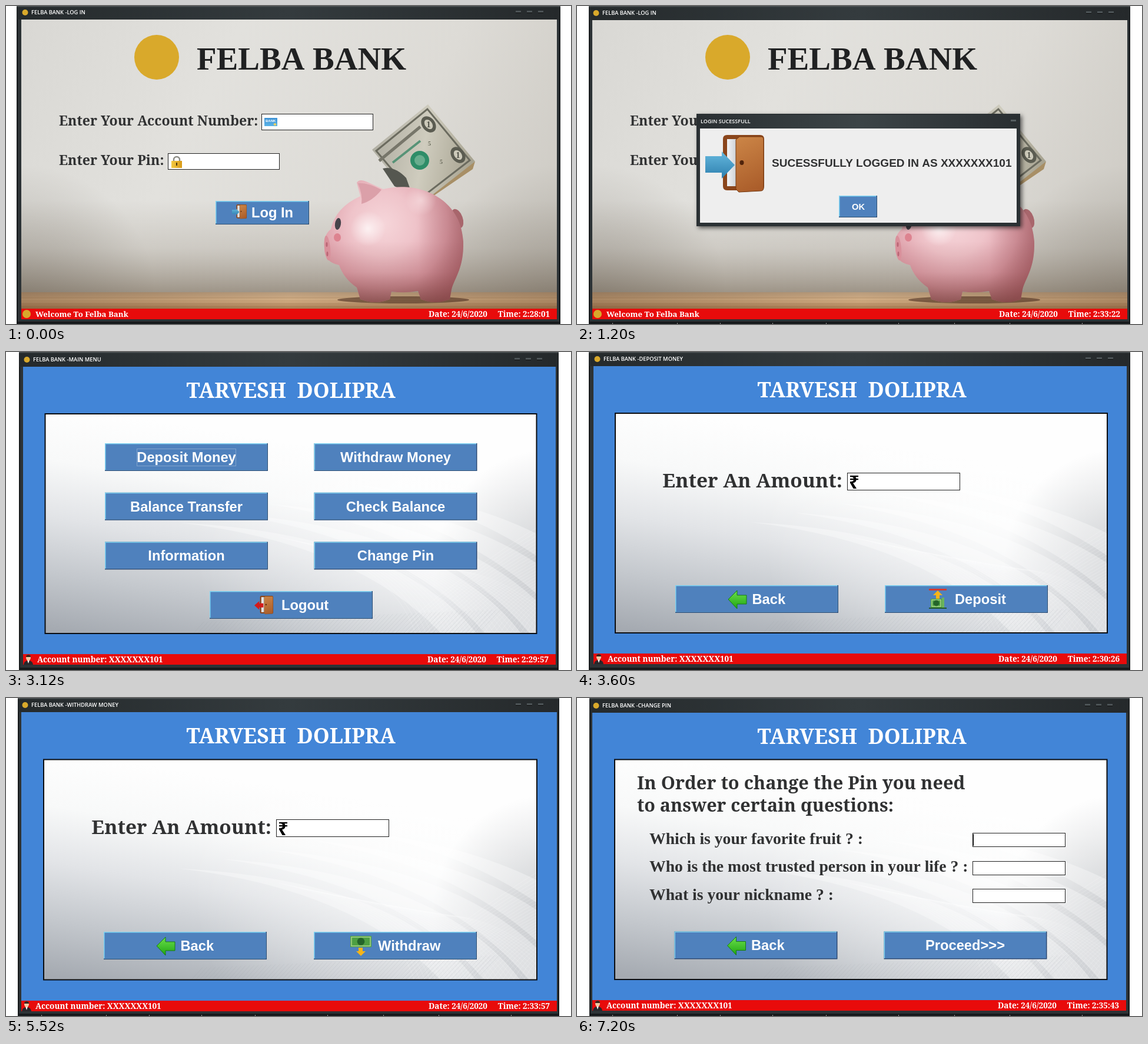
An HTML page with a canvas for the animation above (8000 ms loop, 960 by 540 pixels).

```html
<!DOCTYPE html>
<html lang="en">
<head>
<meta charset="utf-8">
<title>Bank desktop app</title>
<style>
  html, body { margin: 0; width: 100%; height: 100%; overflow: hidden; background: #fff; }
  canvas { display: block; }
</style>
</head>
<body>
<canvas id="stage" width="960" height="540"></canvas>
<script>
const ctx = document.getElementById('stage').getContext('2d');
const SLAB = '"Noto Serif", serif';
const SANS = '"Liberation Sans", Arial, sans-serif';
const TIMES = '"Liberation Serif", "Times New Roman", serif';
const UI = '"Open Sans", sans-serif';
const INK = '#303132', BLUE = '#4285d7', GOLD = '#d9a92b';
const OWNER = 'TARVESH  DOLIPRA', BANK = 'Felba Bank';

// ---------- basic helpers ----------
function rect(x, y, w, h, fill) {
  ctx.fillStyle = fill;
  ctx.fillRect(x, y, w, h);
}
function text(str, x, y, size, family, color = INK, align = 'left', weight = 'bold') {
  ctx.font = `${weight} ${size}px ${family}`;
  ctx.textAlign = align;
  ctx.fillStyle = color;
  ctx.fillText(str, x, y);
}
function shape(d, fill, stroke, width = 1) {
  const path = new Path2D(d);
  if (fill) { ctx.fillStyle = fill; ctx.fill(path); }
  if (stroke) { ctx.strokeStyle = stroke; ctx.lineWidth = width; ctx.stroke(path); }
}
function oval(x, y, rx, ry, fill, turn = 0) {
  ctx.beginPath();
  ctx.ellipse(x, y, rx, ry, turn, 0, 7);
  ctx.fillStyle = fill;
  ctx.fill();
}
function blend(gradient, ...colors) {
  colors.forEach((c, i) => gradient.addColorStop(i / (colors.length - 1), c));
  return gradient;
}
const linear = (x0, y0, x1, y1, ...colors) =>
  blend(ctx.createLinearGradient(x0, y0, x1, y1), ...colors);
const radial = (x, y, r, ...colors) =>
  blend(ctx.createRadialGradient(x, y, 0, x, y, r), ...colors);
function at(x, y, scale, draw) {
  ctx.save();
  ctx.translate(x, y);
  ctx.scale(scale, scale);
  draw();
  ctx.restore();
}
function glow(x, y, r, rgb, alpha) {
  rect(x - r, y - r, 2 * r, 2 * r, radial(x, y, r, `rgba(${rgb},${alpha})`, `rgba(${rgb},0)`));
}

// ---------- icons ----------
function door(x, y, scale, leaving) {
  at(x, y, scale, () => {
    shape('M37 0H93Q100 0 100 7V87Q100 94 93 94H37Q30 94 30 87V7Q30 0 37 0Z', '#8a451b');
    rect(37, 7, 20, 80, linear(37, 0, 57, 0, '#f2f3f4', '#c3c8cd'));
    shape('M52 8L58 3H95Q99 3 99 8V90Q99 95 94 95L57 97L52 92Z',
      linear(52, 0, 99, 95, '#cd8748', '#a85a28'), '#74380f');
    oval(62, 47, 3.5, 4, '#50230b');
    if (leaving) shape('M0 51L26 28V40H48V62H26V74Z', '#d51a1a');
    else shape('M0 36H28V28L50 51L28 74V64H0Z', linear(0, 28, 0, 74, '#65b8de', '#2d7fae'));
  });
}
function card(x, y) {
  rect(x, y, 22, 14, linear(x, y, x, y + 14, '#3f92d4', '#5bb4e8'));
  text('BANK', x + 2, y + 6.5, 6, SANS, '#fff');
  oval(x + 18, y + 11, 2.5, 2, '#e9cf64');
}
function lock(x, y) {
  shape(`M${x + 4} ${y + 9}V${y + 6}A5 5 0 0 1 ${x + 14} ${y + 6}V${y + 9}`, null, '#8d8d86', 2.4);
  rect(x, y + 8, 18, 12, linear(x, 0, x + 18, 0, '#f4cb44', '#d89a16'));
  rect(x + 8, y + 11, 2, 5, '#49370d');
}
function backArrow(x, y) {
  at(x, y, 1, () => shape('M0 15L15 0V8H31V23H15V31Z',
    linear(0, 0, 0, 31, '#6be04c', '#20a512'), '#177c10'));
}
function note(x, y, w, h) {
  rect(x, y, w, h, '#4d9f42');
  ctx.strokeStyle = '#a9d48b';
  ctx.lineWidth = 1.5;
  ctx.strokeRect(x + 2, y + 2, w - 4, h - 4);
  oval(x + w / 2, y + h / 2, h / 3, h / 3, '#24642a');
}
function depositIcon(x, y) {
  rect(x, y + 1, 30, 3, '#d23a32');
  shape(`M${x + 15} ${y + 4}l8 8h-5v6h-6v-6h-5z`, '#f6b418');
  note(x + 3, y + 18, 19, 15);
  rect(x + 22, y + 16, 4, 17, '#6bb45d');
  rect(x, y + 33, 30, 2, '#245a2a');
}
function withdrawIcon(x, y) {
  note(x, y, 36, 19);
  shape(`M${x + 14} ${y + 20}h7v6h5l-8 8l-8 -8h4z`, '#f6b418');
}
function transferIcon(x, y) {
  at(x, y, 1, () => {
    shape('M5 17L29 4L40 17L16 32Z', '#12a552', '#111');
    shape('M1 17L23 2L34 16L12 32Z', '#1bd26b', '#111');
    oval(17, 17, 4, 3, '#13a352');
    shape('M17 6H1M6 1L1 6L6 11M23 27H39M34 22L39 27L34 32', null, '#e3141b', 1.6);
  });
}
function person(x, y) {
  shape(`M${x - 8} ${y + 17}Q${x - 7} ${y + 10} ${x} ${y + 10}T${x + 8} ${y + 17}Z`, '#29262a');
  shape(`M${x - 2} ${y + 9}h4l-2 6z`, '#fff');
  oval(x, y + 5, 4, 5, '#f0c9a2');
  shape(`M${x - 4} ${y + 4}a4 4 0 0 1 8 0z`, '#3a231a');
}

// ---------- controls ----------
function button(x, y, w, h, label, labelX, size = 23.7, align = 'left') {
  rect(x, y, w, h, '#2c4a76');
  rect(x, y, w - 1.5, h - 1.5, '#7fd3f2');
  rect(x + 1.5, y + 1.5, w - 3, h - 3, '#4f81bd');
  text(label, labelX, y + h / 2 + size * 0.355, size, SANS, '#fff', align);
}
function field(x, y, w, h) {
  rect(x, y, w, h, '#fff');
  ctx.strokeStyle = '#222';
  ctx.lineWidth = 1;
  ctx.strokeRect(x + 0.5, y + 0.5, w - 1, h - 1);
}
const rupee = (x, y) => text('₹', x, y, 31, '"Noto Sans", "DejaVu Sans", sans-serif', '#000');

// ---------- window ----------
function frame({ x0, x1, l, r, t, b, ticks }, title, clock, user) {
  rect(x0, 0, x1 - x0, 540, '#171a1c');
  rect(x0 + 2, 1, x1 - x0 - 4, 538, '#2d3336');
  rect(x0 + 1, 1, x1 - x0 - 2, t - 1, linear(x0, 0, x1, 0, '#252a2c', '#343b3e', '#25292b'));
  rect(x0, 0, x1 - x0, 1.5, '#4b5153');
  oval(l + 6.5, t - 12, 5, 5, GOLD);
  text(`FELBA BANK -${title}`, l + 17, t - 9, 9.3, UI, '#fff', 'left', 600);
  for (const dx of [70, 51, 32]) {
    rect(r - dx, t - 15, 9, 3, '#4d5457');
    rect(r - dx, t - 12, 9, 1, '#111');
  }
  rect(l, t, r - l, b - t, BLUE);
  rect(l, b, r - l, 18, '#e80b0b');
  rect(x0, 536, x1 - x0, 4, '#16191b');
  if (ticks) for (const x of [60, 170, 243, 332, 423, 546, 641, 735, 858]) rect(x, 538, 1, 2, '#999');
  if (user) person(l + 9, b + 1);
  else oval(l + 9, b + 9, 7, 7, GOLD);
  text(user ? 'Account number: XXXXXXX101' : `Welcome To ${BANK}`,
    l + 24, b + 14, user ? 13.5 : 13.2, SLAB, '#fff');
  text('Date: 24/6/2020', r - 218, b + 14, 13.5, SLAB, '#fff');
  text(`Time: ${clock}`, r - 12, b + 14, 13.5, SLAB, '#fff', 'right');
}

// Silver panel with sweeping light bands and a fine mesh.
function panel(x, y, w, h) {
  ctx.save();
  ctx.translate(x, y);
  ctx.beginPath();
  ctx.rect(0, 0, w, h);
  ctx.clip();
  rect(0, 0, w, h, linear(120, 0, 60, h, '#fefefe', '#f8f9f9', '#e2e4e7', '#c4c8cd', '#a5aab1'));
  glow(650, 190, 400, '255,255,255', 0.65);
  glow(860, 260, 200, '165,168,173', 0.55);
  for (let i = 0; i < 5; i++) {
    const s = i * 75;
    shape(`M${230 + s} ${185 - i * 16}Q${530 + s} ${220 - i * 10} ${675 + s} 375H${735 + s}`
      + `Q${600 + s} ${205 - i * 10} ${230 + s} ${185 - i * 16}Z`, 'rgba(255,255,255,.32)');
  }
  for (let i = 0; i < 30; i++) {
    shape(`M${400 + i * 9} ${210 + i * 2}Q${590 + i * 6} 250 ${630 + i * 9} 375`,
      null, 'rgba(255,255,255,.26)', 0.7);
    shape(`M${590 + i * 9} 375Q${690 + i * 7} 285 ${840 + i * 5} ${190 + i * 4}`,
      null, 'rgba(255,255,255,.3)', 0.7);
  }
  for (let i = 0; i < 70; i++) {
    shape(`M${250 + i * 7} 375l${20 + i * 0.3} ${-22 - i * 0.3}`, null, 'rgba(150,155,162,.25)', 0.7);
  }
  ctx.restore();
  ctx.strokeStyle = '#0b0d10';
  ctx.lineWidth = 2;
  ctx.strokeRect(x, y, w, h);
}
function account(win, title, clock, box) {
  frame(win, title, clock, true);
  text(OWNER, 484, win.t + 53, 35.5, SLAB, '#fff', 'center');
  panel(...box);
}

// ---------- login photo ----------
function bill() {
  shape('M797 264L793 277L727 322L705 316Z', '#a88f66');
  shape('M622 244L717 167L797 264L700 340Z', linear(625, 240, 790, 270, '#b0aea2', '#cfccbe', '#a8a492'));
  shape('M629 246L716 175L788 262L700 330Z', null, '#6b6b5f', 3);
  shape('M634 263L704 205', null, '#77766a', 5);
  shape('M657 266L704 229', null, '#579377', 4);
  shape('M640 276Q660 271 680 292L690 320L660 306Z', '#555750');
  for (const [x, y] of [[718, 201], [768, 253]]) {
    oval(x, y, 11, 15, '#5b5c51', -0.65);
    oval(x, y, 6, 9, '#cdcaba', -0.65);
    text('1', x, y + 5, 14, TIMES, '#4d4e45', 'center');
  }
  oval(703, 262, 16, 16, '#2f8d68');
  oval(703, 262, 9, 9, '#69ad8e');
  text('5', 717, 237, 10, TIMES, '#676859');
  text('5', 737, 268, 10, TIMES, '#676859');
}
function pig() {
  const body = 'M602 323L596 300Q600 293 612 298L641 311C700 296 773 325 777 400'
    + 'C778 445 763 460 757 481L754 498Q730 508 705 498L700 484Q677 488 655 485L652 498'
    + 'Q628 508 602 498L596 478Q574 463 566 440Q541 435 541 412Q539 388 552 379'
    + 'Q560 342 602 323Z';
  oval(767, 361, 9, 17, '#a8666c', -0.35);
  shape(body, radial(640, 370, 165, '#f6d6da', '#efc4ca', '#dd9ea8', '#b0656f'));
  ctx.save();
  ctx.clip(new Path2D(body));
  rect(530, 290, 260, 220, linear(0, 400, 0, 504, 'rgba(140,72,72,0)', 'rgba(140,72,72,.2)', 'rgba(110,58,52,.65)'));
  rect(530, 290, 260, 220, linear(700, 0, 780, 0, 'rgba(140,75,78,0)', 'rgba(140,75,78,.4)'));
  glow(615, 378, 30, '255,250,250', 0.8);
  glow(705, 330, 26, '255,240,240', 0.5);
  ctx.restore();
  shape('M598 301Q613 299 638 312Q623 331 604 336Q606 320 598 301Z', '#dba0a9');
  oval(564, 370, 5, 10, '#46434a', 0.15);
  oval(563, 393, 6, 7, '#dd8390');
  oval(546, 411, 5, 21, '#d9909b', -0.1);
  oval(545, 405, 1.5, 4, '#b96574');
  oval(546, 421, 1.5, 4, '#b96574');
}
function photo({ l, r, t, b }) {
  const w = r - l;
  ctx.save();
  ctx.beginPath();
  ctx.rect(l, t, w, b - t);
  ctx.clip();
  rect(l, t, w, b - t, linear(l, t, r, 480, '#d9d8d4', '#e2e1dd', '#dddbd6', '#cbc8c1'));
  rect(l, 330, w, 160, linear(0, 330, 0, 490,
    'rgba(170,163,152,0)', 'rgba(170,163,152,.35)', 'rgba(142,131,116,.85)'));
  glow(l, 500, 230, '95,86,74', 0.35);
  glow(r, 500, 230, '95,86,74', 0.3);
  rect(l, 486, w, 28, linear(0, 486, 0, 514, '#b79b7c', '#d3ae85', '#a87c53'));
  rect(l, 486, w, 28, linear(l, 0, r, 0, 'rgba(90,60,35,.35)', 'rgba(90,60,35,0)', 'rgba(90,60,35,.3)'));
  for (let i = 0; i < 4; i++) rect(l, 495 + i * 5, w, 1, 'rgba(125,84,50,.2)');
  oval(675, 499, 112, 6, 'rgba(75,45,32,.6)');
  bill();
  pig();
  ctx.restore();
}
function login(win, clock) {
  frame(win, 'LOG IN', clock, false);
  photo(win);
  oval(256, 87, 38, 38, GOLD);
  text('FELBA BANK', 502, 108, 55, TIMES, '#202122', 'center');
  text('Enter Your Account Number:', 90, 203, 23.1, SLAB);
  text('Enter Your Pin:', 90, 270, 23.1, SLAB);
  field(434, 183, 190, 28);
  card(439, 190);
  field(275, 250, 190, 28);
  lock(281, 255);
  button(356, 331, 159, 40, 'Log In', 417);
  door(384, 337, 0.25);
}

// ---------- scenes ----------
const WIDE = { x0: 20, x1: 940, l: 26, r: 936, t: 24, b: 514, ticks: true };
const WIDE_PANEL = [64, 104.5, 838, 374];

function amountForm(x, y, action, actionX) {
  text('Enter An Amount:', 451, y + 25, 33.4, SLAB, INK, 'right');
  field(459, y, 192, 30);
  rupee(462, y + 27);
  actions(x, y + 191, 523, action, actionX);
}
function actions(x, y, x2, action, actionX) {
  button(x, y, 277, 47, 'Back', x + 130.5);
  backArrow(x + 90, y + 9);
  button(x2, y, 277, 47, action, actionX);
}

const scenes = [
  () => login({ x0: 18, x1: 942, l: 26, r: 936, t: 23, b: 514 }, '2:28:01'),

  () => {
    login({ ...WIDE, r: 935 }, '2:33:22');
    ctx.save();
    ctx.shadowColor = 'rgba(0,0,0,.6)';
    ctx.shadowBlur = 7;
    ctx.shadowOffsetX = ctx.shadowOffsetY = 3;
    rect(203, 183, 550, 191, '#2b3134');
    ctx.restore();
    rect(204, 185, 548, 23, linear(203, 0, 753, 0, '#2a2f32', '#3c4447', '#292e31'));
    text('LOGIN SUCESSFULL', 210, 199, 9.1, UI, '#fff', 'left', 600);
    rect(737, 193, 9, 3, '#565e61');
    rect(209, 208, 538, 160, '#eee');
    door(218, 219, 1);
    text('SUCESSFULLY LOGGED IN AS XXXXXXX101', 331, 273, 19.05, SANS);
    button(445, 322, 65, 37, 'OK', 478, 14.7, 'center');
  },

  () => {
    account({ x0: 22, x1: 939, l: 29, r: 934, t: 25, b: 513 }, 'MAIN MENU', '2:29:57',
      [66.5, 105, 835, 373]);
    const labels = ['Deposit Money', 'Withdraw Money', 'Balance Transfer',
      'Check Balance', 'Information', 'Change Pin'];
    labels.forEach((label, i) => {
      const x = i % 2 ? 523.5 : 168;
      button(x, 155 + Math.floor(i / 2) * 83.7, 277, 47, label, x + 138.5, 23.7, 'center');
    });
    ctx.setLineDash([1, 1]);
    ctx.strokeStyle = '#b5c6dc';
    ctx.lineWidth = 1;
    ctx.strokeRect(222.5, 164.5, 168, 29);
    ctx.setLineDash([]);
    button(346, 406, 277, 47, 'Logout', 468);
    door(422, 414, 0.32, true);
  },

  () => {
    account({ x0: 20, x1: 940, l: 28, r: 934, t: 24, b: 512 }, 'DEPOSIT MONEY', '2:30:26',
      [65, 104, 836, 373]);
    amountForm(167, 205, 'Deposit', 642);
    depositIcon(598, 401);
  },

  () => {
    account(WIDE, 'WITHDRAW MONEY', '2:33:57', WIDE_PANEL);
    amountForm(166, 206, 'Withdraw', 632);
    withdrawIcon(585, 404);
  },

  () => {
    account(WIDE, 'TRANSFER MONEY', '2:34:19', WIDE_PANEL);
    text("Enter Receiver's", 123, 168, 26.6, SLAB);
    text('Account Number:', 361, 201, 26.6, SLAB, INK, 'right');
    text('Enter An Amount:', 361, 260, 26, SLAB, INK, 'right');
    text('Re-type Pin:', 361, 319, 26.6, SLAB, INK, 'right');
    for (const y of [180, 239, 299]) field(372, y, 189, 28);
    card(376, 187);
    rect(402, 183, 1, 21, '#222');
    rupee(374, 264);
    lock(378, 303);
    actions(166, 397, 523, 'Transfer', 640);
    transferIcon(589, 403);
  },

  () => {
    account({ x0: 21, x1: 939, l: 26, r: 933, t: 25, b: 513, ticks: true }, 'CHANGE PIN', '2:35:43',
      [64, 104.5, 836.5, 373.5]);
    text('In Order to change the Pin you need', 102, 155, 30.7, SLAB);
    text('to answer certain questions:', 102, 193, 30.4, SLAB);
    ['Which is your favorite fruit ? :',
      'Who is the most trusted person in your life ? :',
      'What is your nickname ? :'].forEach((question, i) => {
      text(question, 123, 247.5 + i * 47.5, 27.7, TIMES);
      field(672, Math.round(229 + i * 47.5), 158, 24);
    });
    rect(672, 231, 2, 20, '#111');
    actions(165.5, 396.5, 521.5, 'Proceed>>>', 592);
  },
];

// ---------- playback ----------
const start = performance.now();
let shown = -1;
function play() {
  const index = Math.floor(((performance.now() - start) % 8000) / 1200);
  if (index !== shown) {
    ctx.clearRect(0, 0, 960, 540);
    scenes[index]();
    shown = index;
  }
  requestAnimationFrame(play);
}
play();
</script>
</body>
</html>
```
